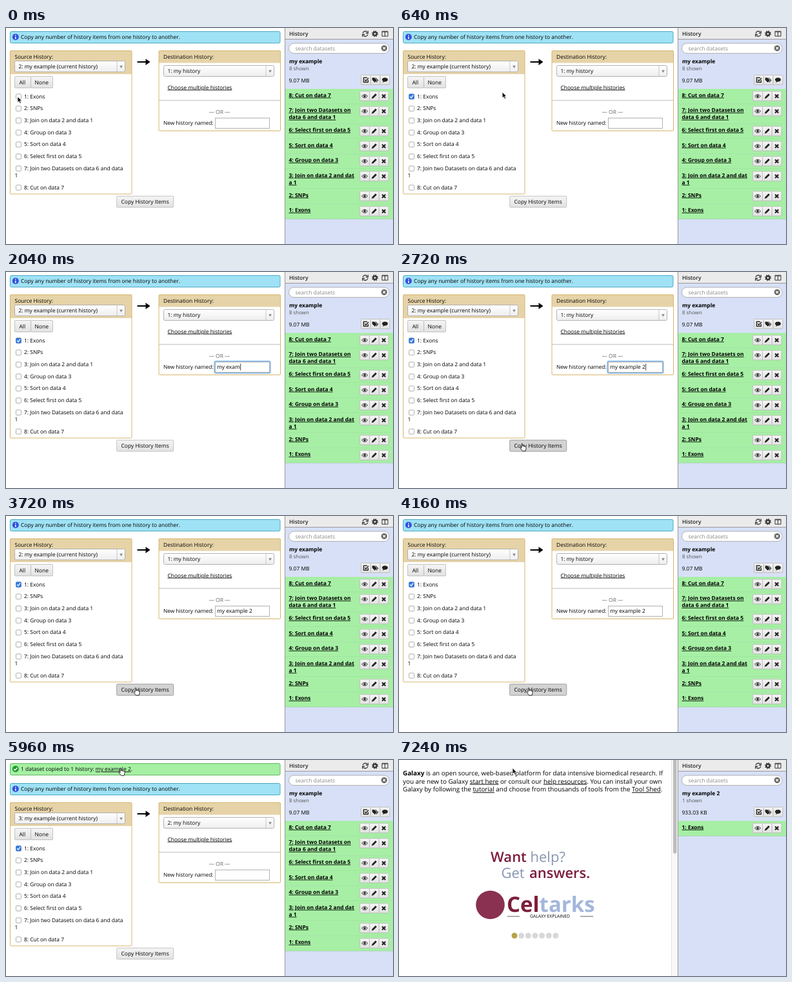
An HTML page for the animation above (7400 ms loop, 600 px wide and 337 px high).

```html
<!DOCTYPE html>
<html lang="en">
<head>
<meta charset="utf-8">
<title>Copy history items</title>
<style>
html, body { margin: 0; width: 100%; height: 100%; overflow: hidden; background: #fff; }
svg { display: block; width: 100%; height: 100%; }
text { font: 8.45px "Open Sans", "Noto Sans", sans-serif; fill: #000; text-rendering: geometricPrecision; }
.b { font-weight: 700; }
.semi { font-weight: 600; }
.u { text-decoration: underline; }
.btn { fill: url(#grey); stroke: #b5b5b5; stroke-width: .8; }
.intro { font-size: 9.86px; }
.big { font-size: 22px; }
.red { fill: #7c1d3b; }
.blue { fill: #8996b0; }
</style>
</head>
<body>
<svg id="stage" viewBox="0 0 600 337" preserveAspectRatio="none"></svg>
<script>
const LOOP = 7400;
const PAGE2 = 4200, PAGE3 = 6680;
const TYPED = "my example 2";

const text = (x, y, s, cls = "", more = "") => `<text x="${x}" y="${y}" class="${cls}" ${more}>${s}</text>`;
const rect = (x, y, w, h, more) => `<rect x="${x}" y="${y}" width="${w}" height="${h}" ${more}/>`;
const icon = (name, x, y) => `<use href="#${name}" x="${x}" y="${y}"/>`;
const button = (x, y, w, h, r = 1.5) => rect(x, y, w, h, `rx="${r}" class="btn"`);

const defs = `<defs>
  <linearGradient id="grey" x2="0" y2="1"><stop stop-color="#f5f5f5"/><stop offset="1" stop-color="#e2e2e2"/></linearGradient>
  <linearGradient id="pale" x2="0" y2="1"><stop stop-color="#fff"/><stop offset="1" stop-color="#eee"/></linearGradient>
  <g id="eye" stroke="#333"><path d="M-4.5 0Q0-5.4 4.5 0Q0 5.4-4.5 0Z" fill="none"/><circle r="1.4" fill="#333"/></g>
  <path id="pencil" d="M-4 4l.8-2.9L2-4 4-2-1.2 3.2Z" fill="#222"/>
  <path id="cross" d="M-2.6-2.6L2.6 2.6M2.6-2.6L-2.6 2.6" stroke="#222" stroke-width="2.1"/>
  <path id="tick" d="M3.5 0V3.5H-3.5V-3.5H2M-2-.5L0 1.5 4.2-3" fill="none" stroke="#222" stroke-width="1.3"/>
  <path id="tags" d="M-5-3.5h3.4l4 4-3.4 3.4-4-4zM-.6-3.5h1.2l4.2 4-3.4 3.4-.7-.7 2.6-2.7z" fill="#222"/>
  <path id="talk" d="M-4.5-.5C-4.5-4.5 4.5-4.5 4.5-.5C4.5 2.4 1 3 -.8 2.7L-3.4 4.2-2.6 2C-4 1.3-4.5.5-4.5-.5Z" fill="#222"/>
  <path id="reload" d="M-3.9-.8A4 4 0 0 1 3-2.6M4.3-4.5V-1H.9M3.9.8A4 4 0 0 1-3 2.6M-4.3 4.5V1H-.9" fill="none" stroke="#333" stroke-width="1.3"/>
  <g id="gear" fill="none" stroke="#333"><circle r="2.6" stroke-width="2.2"/><circle r="4.2" stroke-width="1.5" stroke-dasharray="1.65"/></g>
  <path id="columns" d="M-4.5-3.8H4.5V3.8H-4.5ZM0-3.8V3.8M-4.5-3H4.5" fill="none" stroke="#333"/>
  <path id="arrow" d="M0 0V9.2L2.2 7.3 3.7 10.8 5.4 10 3.9 6.7H6.7Z" fill="#111" stroke="#fff" stroke-width=".7"/>
  <path id="hand" d="M1 1.2C1-.2 2.8-.2 2.8 1.2V4.5C3.2 3.6 4.4 3.8 4.6 4.7C5.2 4 6.3 4.3 6.4 5.2C7.2 4.7 8 5.2 8 6.2V8.4L7.1 11.8H2.7L-.9 7.4C-1.6 6.2-.2 5.6 1 7.2Z" fill="#fff" stroke="#111" stroke-width=".9"/>
  <path id="beam" d="M-2-5Q0-5 0-4V4Q0 5-2 5M2-5Q0-5 0-4M0 4Q0 5 2 5" fill="none" stroke="#222" stroke-width=".8"/>
</defs>`;

const banner = (fill, line, badge, sign) =>
  rect(6.5, 5.5, 418.5, 18, `rx="2" fill="${fill}" stroke="${line}"`) +
  `<circle cx="14.8" cy="14" r="5" fill="${badge}"/>
   <path transform="translate(14.8 14)" d="${sign}" stroke="#fff" stroke-width="1.5" fill="none"/>`;

const box = (x, h, head, title) =>
  rect(x, 35.5, 188.5, h, `rx="1.5" fill="#fff"`) + rect(x, 35.5, 188.5, head, `fill="#e6d3a8"`) +
  rect(x, 35.5, 188.5, h, `rx="1.5" fill="none" stroke="#d6b56c"`) + text(x + 7, 48, title);

const select = (x, y, id) =>
  rect(x, y, 171, 17, `rx="2" fill="url(#pale)" stroke="#aaa" stroke-width=".9"`) +
  `<path d="M${x + 158.5} ${y}v17" stroke="#bbb" stroke-width=".8"/>
   <path d="M${x + 162.6} ${y + 7.2}h4.8l-2.4 4z" fill="#888"/>` + text(x + 6, y + 11.4, "", "", `id="${id}"`);

const datasets = ["1: Exons", "2: SNPs", "3: Join on data 2 and data 1", "4: Group on data 3", "5: Sort on data 4",
  "6: Select first on data 5", "7: Join two Datasets on data 6 and data", "8: Cut on data 7"];

const choices = datasets.map((name, i) => {
  const y = i < 7 ? 107 + i * 18.7 : 249;
  return rect(15.5, y - 4, 8, 8, `rx="1.6" fill="#fff" stroke="#999" stroke-width=".8"`) + text(28, y + 2.6, name);
}).join("");

const form = `<g id="form">
  ${banner("#9fe2f5", "#4da9c4", "#3350dd", "M0-3.2V-1.7M0-.6V3.2")}
  ${text(23, 17, "Copy any number of history items from one history to another.")}
  ${box(6.5, 223.5, 36.5, "Source History:")}${select(13.5, 51.5, "from")}
  ${button(13.5, 75.5, 25, 18)}${button(38.5, 75.5, 34, 18)}${text(20.5, 87.5, "All")}${text(44.5, 87.5, "None")}
  ${choices}${text(13.5, 233, "1")}
  <g id="checked">${rect(15.3, 102.8, 8.4, 8.4, `rx="1.6" fill="#3478dc"`)}
    <path d="M17.2 107l1.8 2 3-4.3" fill="none" stroke="#fff" stroke-width="1.3"/></g>
  <path d="M203.5 52h13v-4l7 5-7 5v-4h-13z" fill="#000"/>
  ${box(237, 125, 19, "Destination History:")}${select(244.5, 58.5, "to")}
  ${text(250.5, 95.5, "Choose multiple histories", "u")}
  <path d="M237 113h188" stroke="#bbb"/>
  ${text(331, 133.8, "— OR —", "", 'text-anchor="middle" style="fill:#666"')}
  ${text(244, 151, "New history named:", "", 'style="font-size:8.3px"')}
  ${rect(323.5, 139.5, 86, 18, `id="glow" rx="2" fill="none" stroke="#8fbdea" stroke-width="2.4"`)}
  ${rect(324.5, 140.5, 84, 16, `fill="#fff" stroke="#aaa" stroke-width=".9"`)}
  ${text(327, 151, "", "", 'id="name"')}<path id="caret" d="M0 143v10.5" stroke="#111" stroke-width=".8"/>
  ${button(171.7, 262.3, 88, 17.5)}
  ${rect(171.7, 262.3, 88, 17.5, `id="hover" rx="1.5" fill="#d3d3d3" stroke="#999" stroke-width=".8"`)}
  ${text(215.6, 274, "Copy History Items", "", 'text-anchor="middle"')}
</g>`;

const done = `<g id="done">
  ${banner("#a5f0a3", "#5fb65d", "#219a2c", "M-2.6 0L-.7 2 2.7-2")}
  <text x="23" y="17">1 dataset copied to 1 history: <tspan class="u">my example 2</tspan>.</text>
</g>`;

const dots = Array.from({ length: 7 }, (_, i) =>
  `<circle cx="${179 + i * 10.65}" cy="274" r="4.5" fill="${i ? "#d8d8d8" : "#b8a24a"}"/>`).join("");

const welcome = `<g id="welcome">
  <text x="6" y="23.7" class="intro"><tspan class="b">Galaxy</tspan> is an open source, web-based platform for data intensive biomedical research. If</text>
  <text x="6" y="36.5" class="intro">you are new to Galaxy <tspan class="u">start here</tspan> or consult our <tspan class="u">help resources</tspan>. You can install your own</text>
  <text x="6" y="49.3" class="intro">Galaxy by following the <tspan class="u">tutorial</tspan> and choose from thousands of tools from the <tspan class="u">Tool Shed</tspan>.</text>
  ${text(142, 159, "Want", "big semi red")}${text(203.5, 159, "help?", "big blue")}
  ${text(158.5, 184, "Get", "big blue")}${text(202, 184, "answers.", "big semi red")}
  <circle cx="141.5" cy="226" r="22.3" fill="#8a3050"/>
  <text x="167" y="236.5" class="b red" style="font-size:33px">Cel<tspan fill="#a3b6dc">tarks</tspan></text>
  ${text(234, 246, "GALAXY EXPLAINED", "", 'text-anchor="middle" style="font-size:6.8px"')}
  <path d="M168 244h19M281 244h20" stroke="#333" stroke-width=".8"/>
  ${dots}
  ${rect(423, 0, 9, 337, `fill="#f8f8f8"`)}<path d="M422.5 0V337" stroke="#e4e4e4"/>
  ${rect(425, -4, 5.5, 150, `rx="2.7" fill="#bdbdbd"`)}
</g>`;

const trio = (x, y, names) => names.map((n, i) =>
  button(x + i * 14.8, y - 7.5, 14.8, 15, 1) + icon(n, x + 7.4 + i * 14.8, y)).join("");

function history(id, title, size, items) {
  let y = 95;
  const rows = items.map(lines => {
    const top = y, h = lines.length > 1 ? 31 : 23.5;
    y += h;
    return rect(433, top, 167, h, `fill="#a6efa4"`) +
      `<path d="M433 ${y}h167" stroke="#83b58b" stroke-width=".7" stroke-dasharray="1"/>` +
      lines.map((s, i) => text(438.5, top + 12.7 + i * 11, s, "b u")).join("") +
      trio(548.7, top + 11.3, ["eye", "pencil", "cross"]);
  }).join("");
  return `<g id="${id}">${text(439, 54.8, title, "b")}
    ${text(439, 66.2, items.length + " shown", "", 'style="font-size:7.9px;fill:#555"')}
    ${text(438.5, 84.6, size)}${trio(550.5, 81, ["tick", "tags", "talk"])}${rows}</g>`;
}

const side = rect(432.5, 0, 168, 337, `fill="#d7e0f6"`) + rect(432.5, 0, 168, 17, `fill="#ebebeb"`) +
  `<path d="M432.5 17.5H600M432.5 0V337" stroke="#999"/>` + text(439, 12, "History", "semi", 'style="fill:#222"') +
  icon("reload", 557, 9) + icon("gear", 572, 9) + icon("columns", 587.5, 9) +
  rect(438.5, 24, 155.5, 15.5, `rx="7.7" fill="#fff" stroke="#aaa" stroke-width=".9"`) +
  text(448.5, 34.6, "search datasets", "", 'style="fill:#888"') +
  `<circle cx="586.3" cy="31.6" r="4.6" fill="#666"/><path d="M584.5 29.8l3.6 3.6m0-3.6l-3.6 3.6" stroke="#fff" stroke-width="1.3"/>`;

const full = [["8: Cut on data 7"], ["7: Join two Datasets on", "data 6 and data 1"], ["6: Select first on data 5"],
  ["5: Sort on data 4"], ["4: Group on data 3"], ["3: Join on data 2 and dat", "a 1"], ["2: SNPs"], ["1: Exons"]];

stage.innerHTML = defs + form + done + welcome + side + history("before", "my example", "9.07 MB", full) +
  history("after", TYPED, "933.03 KB", [["1: Exons"]]) + `<use id="cursor"/>`;

const $ = id => document.getElementById(id);
const show = (id, on) => $(id).setAttribute("display", on ? "inline" : "none");

// Cursor path: time, x, y
const path = [[0, 18, 107], [320, 18, 107], [960, 301, 93], [1120, 309, 112.5], [1500, 345, 148], [2300, 345, 148],
  [2680, 189, 267.5], [3000, 189, 267.5], [3500, 199, 268], [4250, 199, 268], [4900, 180, 57], [5100, 180, 57],
  [5750, 176, 12.5], [LOOP, 176, 12.5]];
const shapes = [[0, "arrow"], [920, "hand"], [1250, "beam"], [2380, "arrow"], [2600, "hand"], [PAGE2, "arrow"],
  [5650, "hand"], [PAGE3, "arrow"]];

function place(t) {
  const i = path.findIndex(p => p[0] > t);
  const [t0, x0, y0] = path[i - 1], [t1, x1, y1] = path[i];
  const u = (t - t0) / (t1 - t0), e = u * u * (3 - 2 * u);
  return [x0 + (x1 - x0) * e, y0 + (y1 - y0) * e];
}

function draw(t) {
  const second = t >= PAGE2, last = t >= PAGE3;
  const focus = t >= 1550 && t < 3450;
  show("form", !last);
  show("done", second && !last);
  show("welcome", last);
  show("before", !last);
  show("after", last);
  $("form").setAttribute("transform", `translate(0 ${second ? 31 : 0})`);
  $("from").textContent = `${second ? 3 : 2}: my example (current history)`;
  $("to").textContent = `${second ? 2 : 1}: my history`;
  show("checked", t >= 240);
  show("hover", t >= 2600 && !second);
  show("glow", focus);
  show("caret", focus);

  const typed = Math.max(0, Math.min(TYPED.length, Math.floor((t - 1650) / 50)));
  const name = $("name");
  name.textContent = second ? "" : TYPED.slice(0, typed);
  if (focus) $("caret").setAttribute("transform", `translate(${327.8 + name.getComputedTextLength()} 0)`);

  const [x, y] = place(t);
  const cursor = $("cursor");
  cursor.setAttribute("href", "#" + shapes.filter(s => s[0] <= t).pop()[1]);
  cursor.setAttribute("transform", `translate(${x} ${y})`);
  show("cursor", t < 1650 || t > 2300);
}

const start = performance.now();
function tick() {
  draw((performance.now() - start) % LOOP);
  requestAnimationFrame(tick);
}
tick();
</script>
</body>
</html>
```
